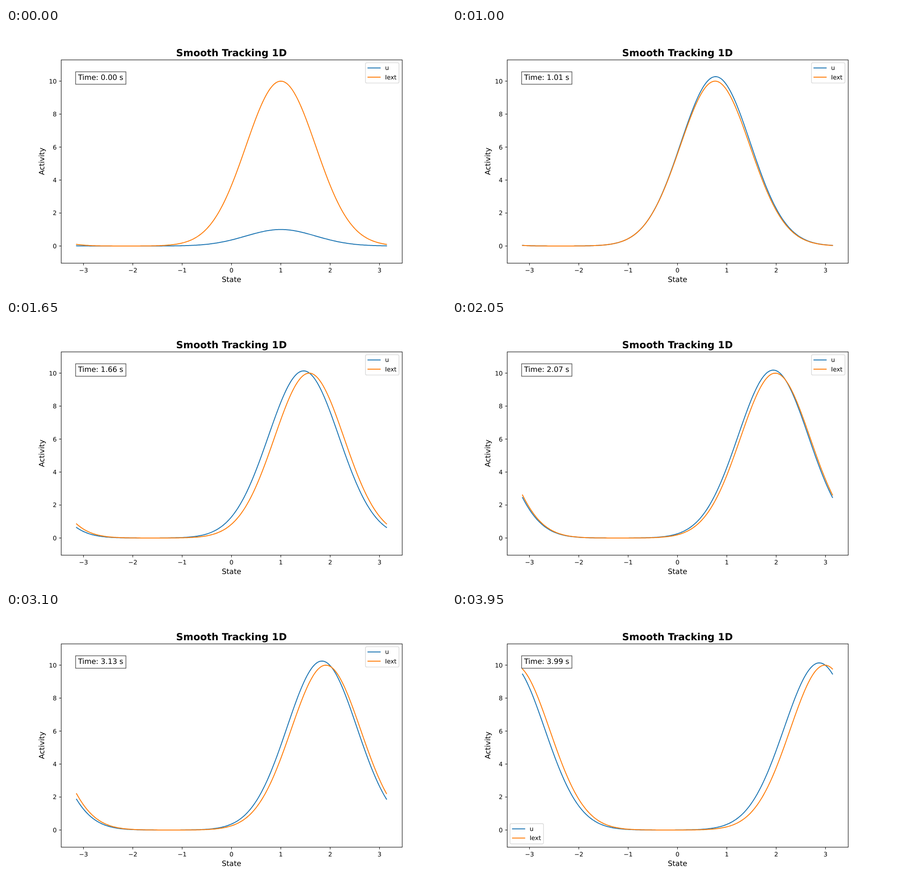
An HTML page that plays this animation: 966x580 px, repeating every 4000 ms.

```html
<!DOCTYPE html>
<html lang="en">
<head>
<meta charset="utf-8">
<title>Smooth Tracking 1D</title>
<style>
  html, body { margin: 0; width: 100%; height: 100%; overflow: hidden; background: #fff; }
  svg { display: block; width: 966px; height: 580px; }
  text { font-family: "DejaVu Sans", sans-serif; font-size: 13.89px; text-rendering: geometricPrecision; white-space: pre; }
  .label { font-size: 16.67px; }
  .title { font-size: 22.22px; font-weight: bold; }
  .mid { text-anchor: middle; }
  .end { text-anchor: end; }
  .curve { fill: none; stroke-width: 2.08; stroke-linecap: square; stroke-linejoin: round; }
  .u { stroke: #1f77b4; }
  .input { stroke: #ff7f0e; }
  .axis { fill: none; stroke: #000; stroke-width: 1.11; }
</style>
</head>
<body>
<svg viewBox="0 0 1000 600" preserveAspectRatio="none">
  <path id="u" class="curve u"/>
  <path id="input" class="curve input"/>
  <rect class="axis" x="125.5" y="72.5" width="775" height="462"/>
  <g id="ticks"></g>
  <text class="title mid" x="512.5" y="63.7">Smooth Tracking 1D</text>
  <text class="label mid" x="512.5" y="577">State</text>
  <text class="label mid" transform="translate(87.3 303) rotate(-90)">Activity</text>
  <rect x="158.2" y="99.6" width="114.4" height="28.2" fill="#fff" fill-opacity=".7"
        stroke="#000" stroke-opacity=".7" stroke-width="1.39"/>
  <text id="time" class="label" x="163.75" y="118.2"></text>
  <g id="legend">
    <rect x="817.06" y="78.94" width="76" height="46.05" rx="2.78" fill="#fff" fill-opacity=".8"
          stroke="#ccc" stroke-opacity=".8" stroke-width="1.39"/>
    <path class="curve u" d="M822.6 90.8H850.4"/>
    <path class="curve input" d="M822.6 111.7H850.4"/>
    <text x="861.5" y="95.7">u</text>
    <text x="861.5" y="116.5">Iext</text>
  </g>
</svg>
<script>
const LOOP = 4000, FRAME = 50, FRAMES = LOOP / FRAME;
const STEPS = 400, STEPS_PER_SECOND = 100;
const CELLS = 256, TAU = 2 * Math.PI;
const WAYPOINTS = [1, 0.75, 2, 1.75, 3];
const WIDTH = 0.5, COUPLING = 4, INHIBITION = 8.1, DT = 0.1;
const LEGEND_MOVE = 3700;

const $ = id => document.getElementById(id);
const cells = Array.from({ length: CELLS }, (_, i) => -Math.PI + TAU * i / (CELLS - 1));
const wrap = d => d - TAU * Math.round(d / TAU);

function stimulusCentre(step) {
  const leg = Math.floor(step / STEPS_PER_SECOND);
  const part = step / STEPS_PER_SECOND - leg;
  return WAYPOINTS[leg] + (WAYPOINTS[leg + 1] - WAYPOINTS[leg]) * part;
}

const stimulus = step => {
  const centre = stimulusCentre(step);
  return cells.map(x => 10 * Math.exp(-0.25 * (wrap(x - centre) / WIDTH) ** 2));
};

// Continuous attractor network with divisive inhibition, integrated by Euler steps.
function simulate() {
  const kernel = cells.map(x => COUPLING * Math.exp(-0.5 * (wrap(x - cells[0]) / WIDTH) ** 2)
    / (Math.sqrt(TAU) * WIDTH));
  const history = [];
  let u = new Array(CELLS).fill(0);
  for (let step = 0; step < STEPS; step++) {
    const squares = u.map(v => v * v);
    const norm = 1 + INHIBITION * squares.reduce((a, b) => a + b, 0);
    const input = stimulus(step);
    u = u.map((v, i) => {
      let recurrent = 0;
      for (let j = 0; j < CELLS; j++) recurrent += kernel[Math.abs(i - j)] * squares[j];
      return v + DT * (-v + recurrent / norm + input[i]);
    });
    history.push({ u, input });
  }
  return history;
}

const history = simulate();
const peak = Math.max(...history.map(h => Math.max(...h.u)));
const px = x => 512.5 + x * 775 / 1.1 / TAU;
const py = y => 495.5 - y * 385 / peak;
const curve = values =>
  "M" + values.map((v, i) => px(cells[i]).toFixed(2) + " " + py(v).toFixed(2)).join("L");

function drawTicks() {
  let out = "";
  for (let x = -3; x <= 3; x++) {
    const name = String(x).replace("-", "\u2212");
    out += `<path class="axis" d="M${px(x)} 534.5v4.86"/><text class="mid" x="${px(x)}" y="555">${name}</text>`;
  }
  for (let y = 0; y <= 10; y += 2) {
    out += `<path class="axis" d="M125.5 ${py(y)}h-4.86"/><text class="end" x="115.3" y="${py(y) + 5.06}">${y}</text>`;
  }
  $("ticks").innerHTML = out;
}

function render(ms) {
  const frame = Math.floor(ms / FRAME);
  const step = Math.floor(frame * (STEPS - 1) / (FRAMES - 1));
  $("u").setAttribute("d", curve(history[step].u));
  $("input").setAttribute("d", curve(history[step].input));
  $("time").textContent = `Time: ${(step / STEPS_PER_SECOND).toFixed(2)} s`;
  $("legend").setAttribute("transform", ms < LEGEND_MOVE ? "" : "translate(-685.12 402.07)");
}

drawTicks();
render(0);
const start = performance.now();
function tick() {
  render((performance.now() - start) % LOOP);
  requestAnimationFrame(tick);
}
requestAnimationFrame(tick);
</script>
</body>
</html>
```
